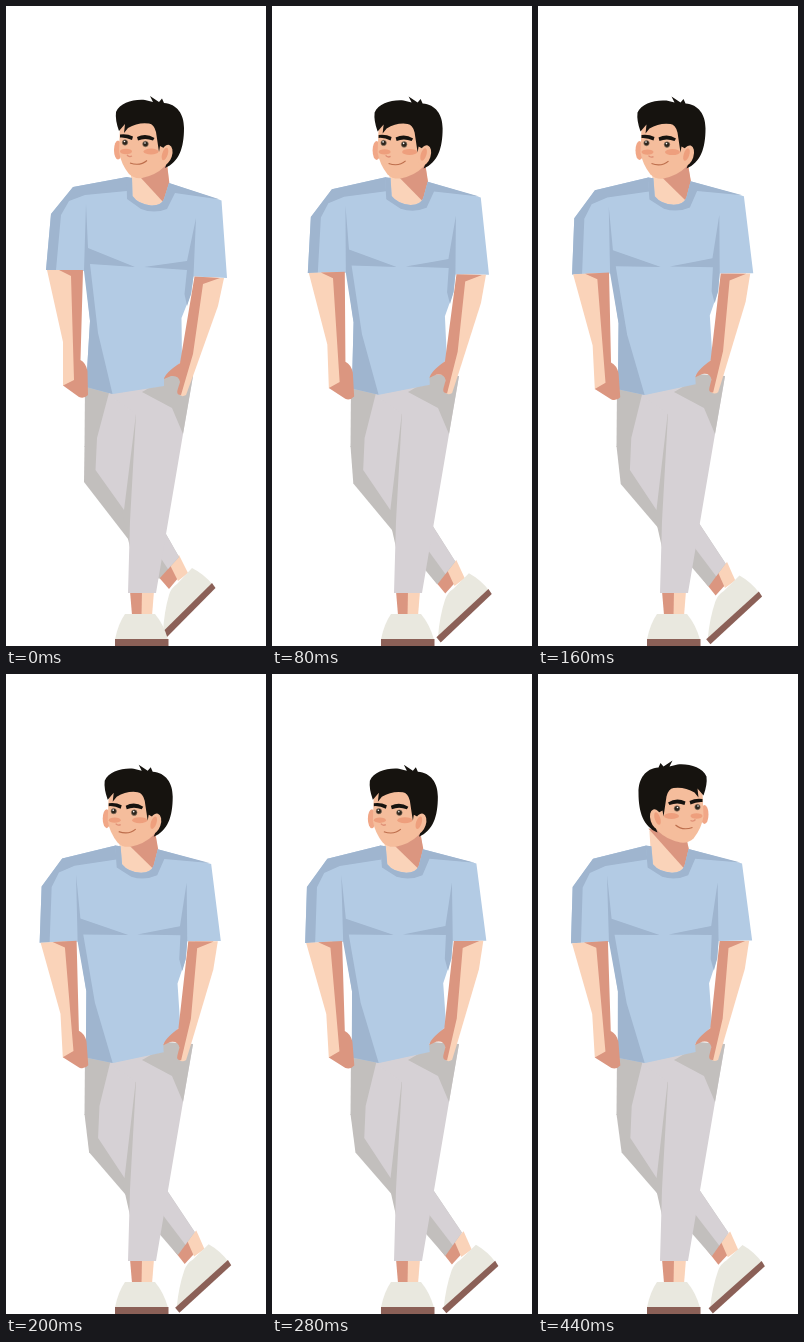
An HTML page for the animation above (480 ms loop, 260 by 640 pixels).

```html
<!DOCTYPE html>
<html lang="en">
<head>
<meta charset="utf-8">
<title>Leaning man</title>
<style>
  html, body { margin: 0; width: 100%; height: 100%; overflow: hidden; background: #fff; }
  svg { display: block; width: 260px; height: 640px; }
  .skin { fill: #fad3b9; }
  .skinDark { fill: #db9680; }
  .face { fill: #f5bd9c; }
  .blush { fill: #ee9f7d; }
  .shirt { fill: #b3cbe4; }
  .shirtDark { fill: #9fb5cf; }
  .pants { fill: #d6d1d5; }
  .pantsDark { fill: #c2bfbd; }
  .shoe { fill: #e9e8df; }
  .sole { fill: #8b6057; }
  .hair { fill: #16130f; }
</style>
</head>
<body>
<svg viewBox="0 0 260 640">
  <g id="backFoot">
    <path class="skinDark" d="M150 568 L165 558 L173 571 L163 583Z"/>
    <path class="skin" d="M164 559 L173 549 L182 567 L172 575Z"/>
    <path class="shoe" d="M186 562 Q198 568 207 579 L157 627 Q158 606 163 589 Q165 582 171 578Z"/>
    <path class="sole" d="M206 577 L209.500 582 L160 632 L155.500 627Z"/>
  </g>

  <path class="pantsDark" d="M79 378 H130 V441 H78.500Z"/>
  <g id="backLeg">
    <path class="pantsDark" d="M78.500 440 H110 L173 551 L153 573 L78 476Z"/>
    <path class="pants" d="M110 440 L173 551 L162 563 L120 500Z"/>
  </g>
  <path class="pantsDark" d="M110 440 H130 L125 546 L116 506Z"/>
  <path id="thigh" class="pants" d="M104 383 L91 432 L89.500 464 L118 504 L130 408 L150 385Z"/>

  <path class="skinDark" d="M124 585 H136 V609 H126Z"/>
  <path class="skin" d="M136 585 H148 L146 610 H135.500Z"/>
  <path class="pants" d="M105 370 H187 L177 428 L150 587 H122 L124 515 L130 408 L104 390Z"/>
  <path class="pantsDark" d="M150 378 L160 368 L187 370 L177 428 L166 402 L136 386Z"/>
  <path class="shoe" d="M119 608 H149 Q158 619 162 633.500 H109 Q112 618 119 608Z"/>
  <path class="sole" d="M109 633 H162.500 V640 H109Z"/>

  <g id="torso">
    <path class="skin" d="M125 156 V194 L140 202 L158 199 L163 177 L161 156Z"/>
    <path id="shadeLeft" class="skinDark" d="M135 172 L161 158 L163.500 178 L158 197Z"/>
    <path id="shadeRight" class="skinDark" d="M124 154 L158 197 L163.500 178 L160 160Z"/>

    <path class="shirt" d="M67 181 L121 171 L126 172 L126.500 190 Q132 198 145 199.500 Q155 200 158 193
      L163 177 L215.500 194.500 L221 272 L187.500 270.500 L185 288 L175.500 312 L176 355 L158 372 V380
      L107 388 L80 381 L84 315 L79 265 L40 264 L45 208Z"/>
    <path class="shirtDark" d="M67 181 L121 171 V185 L79 189 L63 195 L55 209 L50 264 H40 L45 208Z"/>
    <path class="shirtDark" d="M120.500 171 L126 172 L126.500 190 Q132 198 145 199.500 Q155 200 158 193
      L163 177 L214 193.500 L169 187 L161 203 Q148 208 135 203 L121 193Z"/>
    <path class="shirtDark" d="M80 198 L82 242 L129 261 L84 258 L92 327 L106.500 388 L80 381 L84 315 L78 265Z"/>
    <path class="shirtDark" d="M190 212 L181 255 L138 261 L181 264 L178.500 288 L181 300 L185 288 L187.500 270Z"/>

    <path class="skin" d="M41 264 H67 L69 375 L57 380 V336Z"/>
    <path class="skinDark" d="M53 264 H77 L74.500 354 Q80 357 81.500 365 L82 389 Q78 393 73 391 L57 379.500 L68 374 L65 270Z"/>
    <path class="skin" d="M195 271 L218 272 L212 300 L187 370 L180 389 Q175 392 172 387Z"/>
    <path class="skinDark" d="M188.500 270.500 L214 272 L197 278 L187 348 L175 389 Q170 389 171.500 384
      L174 376 Q173 369 165 370 L158 373 Q159 367 174 357Z"/>
  </g>

  <g id="head">
    <ellipse fill="#f1a787" cx="112" cy="144" rx="4" ry="9.500"/>
    <path class="face" d="M114 120 L113 146 Q115 158 123 168 Q128 173 136 172 Q150 169 158 161 L168 150 L160 112 H120Z"/>
    <path class="hair" d="M113 125 Q109 114 110 106 C114 97 127 93 139 94 L147 96 L144 90 L153 96 L156 92.500 L158 97
      C171 98 178 108 178 122 C178 142 173 156 159 162 L165 146 L154 140 L153 146 L150 126 Q148 118 143 117.500
      Q132 116 122 122 L118 127 L119 118Z"/>
    <ellipse class="face" cx="160" cy="149" rx="6" ry="10.500" transform="rotate(18 160 149)"/>
    <ellipse class="blush" cx="159" cy="148" rx="2.800" ry="6.500" transform="rotate(18 159 148)"/>
    <ellipse class="blush" cx="120" cy="145.500" rx="6" ry="2.700"/>
    <ellipse class="blush" cx="145" cy="145.500" rx="7.500" ry="3"/>
    <path class="hair" d="M114 128.500 Q121 127.500 127 130.500 L126 134 Q120 131 114 131.500Z"/>
    <path class="hair" d="M131 131 Q140 126.500 148.500 132 L147 134.500 Q139 131.500 132 134.500Z"/>
    <g fill="#2d251c" stroke="#8a7663" stroke-width=".6">
      <circle cx="119" cy="136.500" r="2.700"/>
      <circle cx="139.500" cy="138" r="2.800"/>
    </g>
    <g fill="#fff">
      <circle cx="118.500" cy="135.500" r=".8"/>
      <circle cx="139" cy="137" r=".8"/>
    </g>
    <path d="M121 149 Q123 151.500 126 150" fill="none" stroke="#df9076" stroke-width="1.300"/>
    <path d="M124 157 Q134 160.500 141 154.500" fill="none" stroke="#bd6e4c" stroke-width="1.100"/>
  </g>
</svg>
<script>
  const LOOP = 480, STEP = 40, SETTLE = 360, TURN = 440, RATE = 0.0108;
  const KNEE = 440, HEM = 555;
  const $ = id => document.getElementById(id);
  const move = (id, value) => $(id).setAttribute("transform", value);
  const show = (id, on) => $(id).setAttribute("visibility", on ? "visible" : "hidden");
  const ease = t => (1 - Math.exp(-RATE * t)) / (1 - Math.exp(-RATE * SETTLE));

  // Shifts nothing at the knee and (dx, dy) at the hem
  function stretch(dx, dy) {
    const sx = dx / (HEM - KNEE), sy = dy / (HEM - KNEE);
    return `matrix(1 0 ${sx} ${1 + sy} ${-sx * KNEE} ${-sy * KNEE})`;
  }

  function draw(ms) {
    const t = Math.floor(ms % LOOP / STEP) * STEP;
    const p = ease(Math.min(t, SETTLE));
    const turned = t >= TURN;

    move("backLeg", stretch(18 * p, 8 * p));
    move("backFoot", `translate(${17 * p} ${9 * p}) rotate(${3 * p} 186 590)`);
    move("thigh", `translate(${10 * p} 0) scale(${1 - 0.08 * p} 1)`);
    move("torso", `rotate(${-3.4 * p} 125 385)`);
    move("head", turned
      ? "translate(278.5 -3.5) scale(-1 1)"
      : `translate(${-12.5 * p} ${0.7 * p})`);
    show("shadeLeft", !turned);
    show("shadeRight", turned);
  }

  const start = performance.now();
  function tick() {
    draw(performance.now() - start);
    requestAnimationFrame(tick);
  }
  tick();
</script>
</body>
</html>
```
